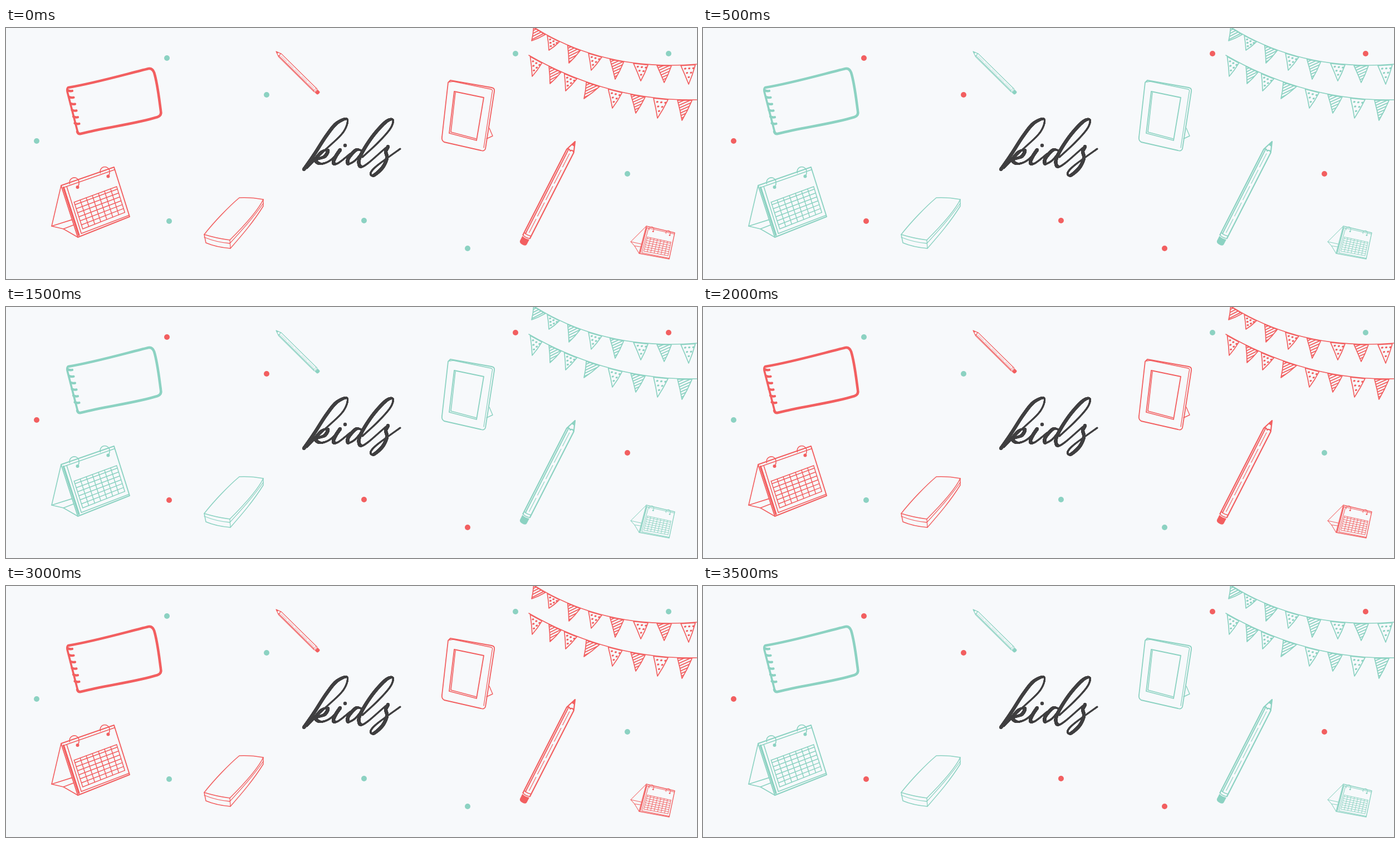
Recreate the animation shown at these times as an HTML page with a canvas. Size 1241 by 451 pixels, loop 4 s.

```html
<!DOCTYPE html>
<html lang="en">
<head>
<meta charset="utf-8">
<title>kids</title>
<style>
html, body { margin: 0; width: 100%; height: 100%; overflow: hidden; background: #f7f9fb; }
canvas { display: block; }
</style>
</head>
<body>
<canvas id="stage" width="1241" height="451" role="img" aria-label="kids"></canvas>
<script>
const ctx = document.getElementById('stage').getContext('2d');
const RED = '#f25f60', TEAL = '#8cd2c2', INK = '#414042', PAPER = '#f7f9fb';
const SWAP_MS = 500;

const line = (width, d) => { ctx.lineWidth = width; ctx.stroke(new Path2D(d)); };
const fill = d => ctx.fill(new Path2D(d));
const disc = (x, y, rx, ry = rx, turn = 0) => {
  ctx.beginPath();
  ctx.ellipse(x, y, rx, ry, turn, 0, Math.PI * 2);
  ctx.fill();
};
const clamp = v => Math.min(1, Math.max(0, v));
const mix = (a, b, t) => a + (b - a) * t;
const mixPoint = (p, q, t) => [mix(p[0], q[0], t), mix(p[1], q[1], t)];

const DOTS = [[289, 54], [468, 120], [55, 203], [293, 347], [643, 346],
  [829, 396], [915, 46], [1190, 46], [1116, 262]];

// Ropes are cubics; each flag is its centre on the rope and its tip.
const ROPES = [
  { curve: [[947, -2], [1010, 38], [1105, 76], [1241, 65]], striped: 0,
    flags: [[958, 944, 23], [983, 975, 40], [1020, 1011, 63], [1058, 1051, 76],
      [1097, 1094, 92], [1140, 1140, 95], [1182, 1182, 98], [1225, 1226, 101]] },
  { curve: [[939, 49], [1010, 90], [1115, 132], [1241, 129]], striped: 1,
    flags: [[952, 945, 87], [986, 977, 100], [1014, 1005, 113], [1054, 1038, 127],
      [1094, 1089, 144], [1135, 1131, 153], [1176, 1170, 162], [1219, 1214, 166]] }
];

function along(points, t) {
  while (points.length > 1) points = points.slice(1).map((p, i) => mixPoint(points[i], p, t));
  return points[0];
}

function ropeY(curve, x) {
  let low = 0, high = 1;
  for (let i = 0; i < 20; i++) {
    const mid = (low + high) / 2;
    if (along(curve, mid)[0] < x) low = mid; else high = mid;
  }
  return along(curve, low)[1];
}

function flag(curve, [x, tx, ty], striped) {
  const half = mix(10.5, 13, clamp((x - 960) / 180));
  const ax = x - half, bx = x + half;
  const ay = ropeY(curve, ax) + 1, by = ropeY(curve, bx) + 1;
  const side = (px, py) => `${(px + tx) / 2 + 1} ${(py + ty) / 2 + 1}`;
  const d = `M${ax} ${ay}Q${side(ax, ay)} ${tx} ${ty}Q${side(bx, by)} ${bx} ${by}Z`;
  line(1.7, d);
  if (striped) {
    ctx.save();
    ctx.clip(new Path2D(d));
    for (let y = ay + 2; y < ty + 18; y += 5) line(1.8, `M${ax - 6} ${y + 6}L${bx + 4} ${y - 10}`);
    ctx.restore();
    return;
  }
  for (let row = 0; row < 3; row++) {
    const v = .17 + row * .23;
    for (let col = 0; col < 3 - row; col++) {
      const u = .21 + col * .28;
      disc(mix(ax, bx, u) + (tx - ax) * v, mix(ay, by, u) + (ty - ay) * v, 2.1, 1.6, -.3);
    }
  }
}

function bunting() {
  for (const { curve, flags, striped } of ROPES) {
    const [from, ...rest] = curve;
    line(1.6, `M${from}C${rest}`);
    flags.forEach((f, i) => flag(curve, f, i % 2 === striped));
  }
}

function notebook() {
  line(4.6, 'M112 107C160 99 215 83 256 73Q263 72 266 80C272 99 275 127 278 149Q280 157 272 160C230 173 180 178 134 190Q129 191 128 186');
  line(3.6, 'M112 107Q109 108 110 114L129 188');
  for (let i = 0; i < 6; i++) {
    const x = 111 + i * 2.5, y = 112 + i * 11.8;
    line(4.2, `M${x} ${y}Q${x + 4} ${y + 2} ${x + 8} ${y + 1}`);
  }
}

function pencil(x, y, angle, scale, weight) {
  ctx.save();
  ctx.translate(x, y);
  ctx.rotate(angle);
  ctx.scale(scale, scale);
  const w = weight / scale;
  fill('M0 0L9 -3.5L8 3.5Z');
  line(w, 'M192 -7H19L0 0L19 7H192M19 -7Q14 -3 19 0Q15 4 19 7');
  line(w * .9, 'M19 4H188');
  for (let i = 0; i < 5; i++) line(w * .5, `M${24 + i * 33} -1h27`);
  line(w * .7, 'M187 -7Q190 0 187 7M192 -7Q195 0 192 7');
  fill('M194 -7Q197 0 194 7H204Q208 6 208 0Q208 -7 204 -7Z');
  ctx.restore();
}

function frame() {
  line(1.8, 'M794 98L798 94L872 107Q878 108 877 114L861 217Q859 222 853 220L787 205Q782 202 783 196Z');
  line(1.3, 'M796 97L803 96L871 110Q875 111 873 116L858 215');
  line(1.8, 'M805 114L858 125L845 202L796 189Z');
  line(1.6, 'M807 116L799 187L844 199');
  line(1.4, 'M868 180L874 194L863 199');
}

function eraser() {
  line(1.5, 'M419 305Q440 304 462 308C452 330 420 363 402 381Q378 378 356 371C374 348 400 321 419 305Z');
  line(1.5, 'M462 308V320C444 349 424 372 403 396Q378 394 359 386L356 371');
  line(1.3, 'M356 376Q378 385 402 387C423 364 444 341 462 315M402 381L403 396');
}

// Everything on the sheet is placed in its own 0..1 space.
function calendar([a, b, c, d], foot, scale) {
  const at = (u, v) => mixPoint(mixPoint(a, b, u), mixPoint(d, c, u), v);
  const rule = (weight, ...points) => line(weight, 'M' + points.join('L'));
  const thin = mix(.5, 1.6, scale);
  rule(thin + .3, a, b, c, d, a);
  rule(thin, at(.02, .05), at(1, .05));
  rule(3.4 * scale, at(.03, .05), at(.03, .97));
  rule(thin, at(.09, .05), at(.08, .96), at(.99, .97));
  const bend = mixPoint(foot, d, .45);
  bend[1] -= 4 * scale;
  rule(thin, a, foot, bend, d);
  rule(thin, foot, at(0, .66));
  rule(thin, bend, at(0, .76));

  for (const u of [.27, .85]) {
    const [x, y] = at(u, .13);
    const ring = [-14, -6, -17, -16, -3, -22, 2, -12, 4, -5, 0, 0].map((n, i) => n * scale + (i % 2 ? y : x));
    line(thin, `M${ring.slice(0, 2)}C${ring.slice(2, 8)}Q${ring.slice(8)}`);
    disc(x, y, 3 * scale);
  }

  const left = .13, right = .94, top = .37, bottom = .89;
  for (let i = 0; i <= 7; i++) {
    const u = mix(left, right, i / 7);
    rule(thin * .93, at(u, top), at(u, bottom));
  }
  rule(thin * .93, at(left, top), at(right, top));
  for (let i = 0; i <= 6; i++) {
    const v = mix(top + .05, bottom, i / 6);
    rule(thin * .93, at(left, v), at(right, v));
  }
}

const LETTERS = [
  [[540, 252], [570, 222], [605, 188], [613, 164], [594, 171], [575, 194], [553, 228], [535, 254]],
  [[541, 250], [554, 235], [566, 222], [578, 220], [572, 231], [556, 237], [565, 244], [582, 238], [600, 220]],
  [[600, 219], [592, 231], [588, 242], [596, 243], [618, 226]],
  [[640, 221], [629, 219], [615, 234], [615, 244], [628, 237], [642, 219]],
  [[640, 232], [668, 206], [690, 181], [695, 165], [683, 168], [662, 190], [644, 216], [634, 237], [637, 249],
    [650, 243], [684, 214], [682, 222], [684, 234], [676, 251], [660, 265], [655, 260], [668, 246], [708, 217]]
];

// A pen following a smooth curve through the points, heavier on downstrokes.
function brush(points) {
  const point = i => points[Math.min(points.length - 1, Math.max(0, i))];
  for (let i = 0; i < points.length - 1; i++) {
    const p = point(i - 1), q = point(i), r = point(i + 1), s = point(i + 2);
    for (let step = 0; step <= 80; step++) {
      const t = step / 80;
      const value = k => q[k] + t / 2 * (r[k] - p[k] +
        t * (2 * p[k] - 5 * q[k] + 4 * r[k] - s[k] + t * (3 * (q[k] - r[k]) + s[k] - p[k])));
      const slope = k => (r[k] - p[k]) / 2 + t * (2 * p[k] - 5 * q[k] + 4 * r[k] - s[k]) +
        1.5 * t * t * (3 * (q[k] - r[k]) + s[k] - p[k]);
      const dx = slope(0), dy = slope(1);
      const down = dy / (Math.hypot(dx, dy) || 1);
      disc(value(0), value(1), mix(1.5, 2.9, clamp((down + .4) / 1.1)));
    }
  }
}

function draw(main, accent) {
  ctx.fillStyle = PAPER;
  ctx.fillRect(0, 0, 1241, 451);
  ctx.lineCap = ctx.lineJoin = 'round';
  ctx.fillStyle = ctx.strokeStyle = main;
  notebook();
  pencil(485, 42, Math.atan2(76, 77), .52, 1.2);
  pencil(1022, 204, Math.atan2(184, -94), 1, 2.2);
  frame();
  eraser();
  calendar([[99, 283], [194, 250], [222, 339], [129, 376]], [82, 356], 1);
  calendar([[1150, 356], [1201, 368], [1191, 415], [1137, 405]], [1122, 384], .48);
  bunting();
  ctx.fillStyle = accent;
  DOTS.forEach(([x, y]) => disc(x, y, 5));
  ctx.fillStyle = INK;
  LETTERS.forEach(brush);
  disc(609, 211, 3.2);
}

const start = performance.now();
let shown = -1;
function tick(now) {
  const phase = Math.floor(Math.max(0, now - start) / SWAP_MS) % 2;
  if (phase !== shown) {
    draw(...(phase ? [TEAL, RED] : [RED, TEAL]));
    shown = phase;
  }
  requestAnimationFrame(tick);
}
tick(start);
</script>
</body>
</html>
```
